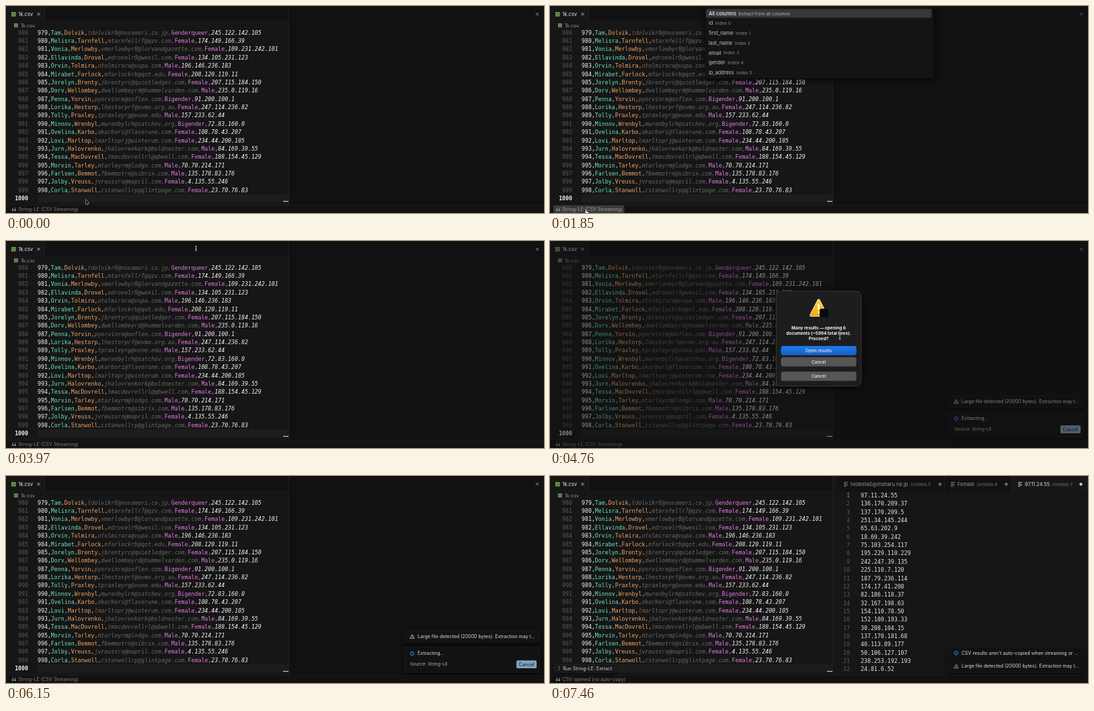
An HTML page with a canvas that plays this animation: 800 px wide and 309 px high, repeating every 7490 ms.

```html
<!DOCTYPE html>
<html lang="en">
<head>
<meta charset="utf-8">
<title>CSV extraction</title>
<style>
html, body { margin: 0; width: 100%; height: 100%; overflow: hidden; background: #121212; }
canvas { display: block; width: 800px; height: 309px; }
</style>
</head>
<body>
<canvas id="stage"></canvas>
<script>
const W = 800, H = 309, LOOP = 7490;
const MONO = '"DejaVu Sans Mono", "Noto Sans Mono", monospace';
const SANS = 'Inter, Roboto, sans-serif';
const CODE = 8.26, ROW = 12.37;

const T = {
  hoverOn: 960, pick: 1640, hoverOff: 2480, picked: 3850, toast: 4010,
  modal: 4260, press: 5700, close: 5780, closed: 5980, results: 6230, hide: 6130
};

const people = `Tam Dolvik nuvamori.co.jp Genderqueer 245.122.142.105
Melisra Tarnfell qzv.com Female 174.149.166.39
Vonia Merlowby lorvandgazette.com Female 109.231.242.101
Ellavinda Drovel wexil.com Female 134.105.231.123
Orvin Tolmira vupa.com Male 196.146.236.183
Mirabet Farlock qot.edu Female 208.120.119.11
Jorelyn Brenty quietledger.com Female 207.115.184.150
Dorv Wellombey hummelvarden.com Male 235.0.119.16
Penna Yorvin ooflen.com Bigender 91.200.100.1
Lorika Hestorp evmo.org.au Female 247.114.236.82
Tolly Praxley vune.edu Male 157.233.62.44
Minnov Wrenbyl satchov.org Bigender 72.83.160.0
Ovelina Karbo flavorune.com Female 108.78.43.207
Lovi Marltop winterum.com Female 234.44.200.105
Jurn Halovrenko boldnester.com Male 84.169.39.55
Tessa MacDovrell qbwell.com Female 188.154.45.129
Morvin Tarley lodgo.com Male 70.70.214.171
Farlsen Bemmot sibrix.com Male 135.178.83.176
Jolby Vreuss mapril.com Female 4.135.55.246
Corla Stanwoll glintpage.com Female 23.70.76.83`.split('\n').map((line, i) => {
  const [first, last, host, gender, ip] = line.split(' ');
  const mail = first[0].toLowerCase() + last.toLowerCase() + (978 + i).toString(36) + '@' + host;
  return [String(979 + i), first, last, mail.replace(/^(.*?)(..)@/, (m, a) => a + 'r' + (6 + i).toString(36) + '@'), gender, ip];
});

const addresses = `97.11.24.55 136.170.209.37 137.170.209.5 251.34.145.244 65.63.202.9
18.69.39.242 75.103.254.117 195.229.110.229 242.247.39.135 225.110.7.120
187.79.236.114 174.17.41.208 82.186.118.37 32.167.198.63 154.110.78.50
152.180.193.33 30.208.104.15 137.170.181.68 40.113.89.177 50.106.127.107
238.253.192.193 24.81.6.52 31.176.49.136`.split(/\s+/);

const columns = ['id', 'first_name', 'last_name', 'email', 'gender', 'ip_address'];
const inks = ['#f4f4f4', '#69e8bf', '#efa461', '#686868', '#e57be6', '#f4f4f4'];

const canvas = document.getElementById('stage');
const c = canvas.getContext('2d');
const dpr = window.devicePixelRatio || 1;
canvas.width = W * dpr;
canvas.height = H * dpr;
c.textBaseline = 'alphabetic';

const clamp = v => Math.max(0, Math.min(1, v));
const ease = v => (v = clamp(v), v * v * (3 - 2 * v));

// y is the middle of the lowercase letters
function text(s, x, y, size, color, style = '', align = 'left', font = SANS) {
  c.font = `${style} ${size}px ${font}`;
  c.textAlign = align;
  c.fillStyle = color;
  c.fillText(s, x, y + size * 0.34);
  return c.measureText(s).width;
}
const code = (s, x, y, color, style, align) => text(s, x, y, CODE, color, style, align, MONO);

function rect(x, y, w, h, color) {
  c.fillStyle = color;
  c.fillRect(x, y, w, h);
}

function box(x, y, w, h, r, fill, stroke) {
  c.beginPath();
  c.roundRect(x, y, w, h, r);
  c.fillStyle = fill;
  c.fill();
  if (stroke) {
    c.shadowColor = 'transparent';
    c.strokeStyle = stroke;
    c.lineWidth = 0.6;
    c.stroke();
  }
}

function shadowed(blur, color, draw) {
  c.save();
  c.shadowColor = color;
  c.shadowBlur = blur * dpr;
  c.shadowOffsetY = 2 * dpr;
  draw();
  c.restore();
}

function lines(points, color, width = 0.8) {
  c.beginPath();
  for (const [x1, y1, x2, y2] of points) {
    c.moveTo(x1, y1);
    c.lineTo(x2, y2);
  }
  c.strokeStyle = color;
  c.lineWidth = width;
  c.stroke();
}

function cross(x, y, color) {
  const r = 2.2;
  lines([[x - r, y - r, x + r, y + r], [x - r, y + r, x + r, y - r]], color);
}

function dot(x, y, r, color) {
  c.beginPath();
  c.arc(x, y, r, 0, 7);
  c.fillStyle = color;
  c.fill();
}

function tableIcon(x, y, s) {
  rect(x, y, s, s, '#83b65b');
  const a = s / 3;
  lines([[x, y + a, x + s, y + a], [x, y + 2 * a, x + s, y + 2 * a],
    [x + a, y, x + a, y + s], [x + 2 * a, y, x + 2 * a, y + s]], '#31482a', 0.6);
}

function leftPane() {
  rect(0, 0, 420, 297, '#161617');
  rect(57, 0, 363, 23.5, '#111112');
  rect(57, 0, 0.7, 23.5, '#262626');
  rect(57, 23, 363, 0.6, '#222');
  rect(420, 0, 0.8, 297, '#262626');
  tableIcon(8, 9, 6.5);
  text('1k.csv', 18.6, 12.2, 7.4, '#eeeeee');
  cross(48.5, 12.2, '#d8d8d8');

  rect(47, 281, 373, 12.2, '#1d1d1e');
  c.save();
  c.beginPath();
  c.rect(0, 34.5, 420, 263);
  c.clip();
  people.forEach((fields, i) => {
    const y = 39.9 + i * ROW;
    code(String(980 + i), 33, y, '#5a5a5a', '', 'right');
    let x = 47;
    fields.forEach((f, k) => {
      x += code(f + (k < 5 ? ',' : ''), x, y, inks[k], k === 3 || k === 5 ? 'italic' : '');
    });
  });
  code('1000', 33, 287.3, '#f2f2f2', 'bold', 'right');
  c.restore();
  rect(412, 291, 8, 1.2, '#c8c8c8');
  tableIcon(12, 26, 5.8);
  text('1k.csv', 22, 29.2, 7.3, '#929292');
}

function fileTab(x, w, name, label, active) {
  rect(x, 0, w, 23.5, active ? '#171718' : '#121213');
  rect(x + w - 0.7, 0, 0.7, 23.5, '#272727');
  const ink = active ? '#dcdcdc' : '#969696';
  lines([[x + 9, 9.5, x + 15, 9.5], [x + 9, 11.5, x + 13.5, 11.5],
    [x + 9, 13.5, x + 15, 13.5], [x + 9, 15.5, x + 12.5, 15.5]], ink, 0.8);
  const end = x + 19 + text(name, x + 19, 12.2, 7.4, ink);
  text(label, end + 4, 12.6, 6.4, '#707070');
}

function rightPane(open) {
  rect(420.8, 0, 379.2, 297, open ? '#161617' : '#111112');
  if (!open) {
    cross(790, 12.2, '#a0a0a0');
    return;
  }
  fileTab(428, 159, 'tvolesta0@monaru.ne.jp', 'Untitled-5');
  fileTab(587, 100, 'Female', 'Untitled-6');
  fileTab(687, 113, '97.11.24.55', 'Untitled-7', true);
  dot(580, 12.2, 2.2, '#6d6d6d');
  dot(678.5, 12.2, 2.2, '#6d6d6d');
  dot(789.5, 12.2, 2.2, '#c8c8c8');
  c.save();
  c.beginPath();
  c.rect(421, 23, 379, 274);
  c.clip();
  addresses.forEach((ip, i) => {
    const y = 29.2 + i * 12.35;
    code(String(i + 1), 446, y, i ? '#5a5a5a' : '#8a8a8a', '', 'right');
    code(ip, 462, y, '#e6e6e6');
  });
  c.restore();
}

function quoteIcon(x, y) {
  for (const dx of [0, 3.6]) {
    dot(x + dx + 1.4, y + 1.3, 1.35, '#8c8c8c');
    c.beginPath();
    c.moveTo(x + dx + 0.4, y + 1);
    c.quadraticCurveTo(x + dx + 0.4, y - 1.8, x + dx + 2.6, y - 2.5);
    c.strokeStyle = '#8c8c8c';
    c.lineWidth = 0.9;
    c.stroke();
  }
}

function statusBar(t) {
  rect(0, 297, W, 12, '#121213');
  rect(0, 297, W, 0.6, '#222');
  const hover = t >= T.hoverOn && t < T.hoverOff;
  if (hover) box(5, 297.6, 105.5, 11.4, 1.5, '#3a3a3a');
  quoteIcon(8.8, 303.5);
  const label = t < T.results ? 'String-LE (CSV Streaming)' : 'CSV opened (no auto-copy)';
  text(label, 18.3, 303.6, 7.1, hover ? '#a2a2a2' : '#808080');
}

function tooltip() {
  shadowed(4, '#000a', () => box(5, 281, 93, 12.4, 2, '#19191a', '#292929'));
  dot(13.3, 285.3, 0.7, '#d0d0d0');
  dot(13.3, 288.8, 0.7, '#d0d0d0');
  text('Run String-LE: Extract', 19.2, 287.3, 7, '#cfcfcf');
}

function quickPick() {
  shadowed(10, '#000d', () => box(230.5, 0, 340, 108, [0, 0, 4, 4], '#141415'));
  box(232, 4.6, 335.5, 12.8, 2, '#373738');
  ['All columns', ...columns].forEach((name, i) => {
    const y = 11.2 + i * 14.7;
    const w = text(name, 236, y, 7.4, i ? '#c4c4c4' : '#f2f2f2', i ? '' : '500');
    text(i ? `Index ${i - 1}` : 'Extract from all columns', 236 + w + 3.5, y + 0.2, 6.7, i ? '#868686' : '#b8b8b8');
  });
}

function warnIcon(x, y, color) {
  c.beginPath();
  c.moveTo(x, y - 3);
  c.lineTo(x + 3.2, y + 2.7);
  c.lineTo(x - 3.2, y + 2.7);
  c.closePath();
  c.strokeStyle = color;
  c.lineWidth = 0.8;
  c.stroke();
  lines([[x, y - 1, x, y + 0.8], [x, y + 1.4, x, y + 2]], color, 0.7);
}

function infoIcon(x, y) {
  c.beginPath();
  c.arc(x, y, 2.8, 0, 7);
  c.strokeStyle = '#3794ff';
  c.lineWidth = 0.9;
  c.stroke();
  lines([[x, y - 1.5, x, y - 0.8], [x, y - 0.3, x, y + 1.5]], '#3794ff', 0.7);
}

const toastBox = (y, h) => shadowed(6, '#000c', () => box(591.5, y, 202.5, h, 2.5, '#121213', '#202021'));
const bigFile = 'Large file detected (20000 bytes). Extraction may t...';

function toasts(done) {
  if (done) {
    toastBox(255, 18.5);
    toastBox(275, 18.5);
    infoIcon(604, 264.3);
    text("CSV results aren't auto-copied when streaming or ...", 612, 264.2, 7, '#dedede');
    warnIcon(604, 284, '#dc9450');
    text(bigFile, 612, 284, 7, '#dedede');
    return;
  }
  toastBox(230.5, 18.5);
  toastBox(255.5, 38);
  warnIcon(604, 239.6, '#d0d0d0');
  text(bigFile, 612, 239.8, 7, '#dedede');
  infoIcon(604, 265);
  text('Extracting...', 612, 265, 7, '#dedede');
  text('Source: String-LE', 601, 281, 6.7, '#b4b4b4');
  box(759, 275.3, 30, 11.8, 1.5, '#81a1c1');
  text('Cancel', 774, 281.2, 7, '#15181d', '', 'center');
}

function button(y, label, fill) {
  box(343.5, y, 112, 13.7, 3.2, fill);
  text(label, 399.5, y + 6.9, 6.4, '#f0f0f0', '500', 'center');
}

function caution() {
  c.beginPath();
  c.moveTo(399.5, 88.5);
  c.lineTo(411, 111);
  c.lineTo(388, 111);
  c.closePath();
  c.lineJoin = 'round';
  c.strokeStyle = '#e9e6dc';
  c.lineWidth = 4;
  c.stroke();
  const g = c.createLinearGradient(0, 88, 0, 112);
  g.addColorStop(0, '#ffd13a');
  g.addColorStop(1, '#efab0c');
  c.fillStyle = c.strokeStyle = g;
  c.lineWidth = 2.4;
  c.stroke();
  c.fill();
  c.lineJoin = 'miter';
  box(398.2, 94, 2.6, 9, 1.3, '#fffdf4');
  dot(399.5, 106.4, 1.5, '#fffdf4');
  box(401, 101, 13, 13, 2.8, '#0b0b0b');
}

function modal(t) {
  const shown = t < T.close ? ease((t - T.modal) / 160) : 1 - (t - T.close) / (T.closed - T.close);
  const leaving = t >= T.close;
  const s = 0.9 + 0.1 * shown;
  c.save();
  c.globalAlpha = clamp(shown);
  c.translate(399.5, 145.5);
  c.scale(s, s);
  c.translate(-399.5, -145.5);
  shadowed(14, '#000c', () => box(336.3, 75, 126.6, 141.5, 7, leaving ? '#252525' : '#1d1d1e', '#505050'));
  caution();
  ['Many results — opening 6', 'documents (~5994 total lines).', 'Proceed?'].forEach((s, i) =>
    text(s, 399.5, 130 + i * 8, 6.4, '#f4f4f4', 'bold', 'center'));
  const blue = c.createLinearGradient(0, 157, 0, 171);
  blue.addColorStop(0, '#2279e8');
  blue.addColorStop(1, '#1260ca');
  button(156.7, 'Open results', leaving ? '#737373' : t >= T.press ? '#1a58ad' : blue);
  button(173.6, 'Cancel', '#565656');
  button(195, 'Cancel', '#565656');
  c.restore();
}

function polygon(points, fill, stroke) {
  c.beginPath();
  points.forEach(([x, y]) => c.lineTo(x, y));
  c.closePath();
  c.lineJoin = 'round';
  c.strokeStyle = stroke;
  c.lineWidth = 1;
  c.stroke();
  c.fillStyle = fill;
  c.fill();
  c.lineJoin = 'miter';
}

// start, end, x, y
const moves = [
  [480, 1120, 53.5, 304], [2400, 3200, 282.5, 11],
  [4080, 4700, 431, 143.5], [4980, 5480, 422.5, 168]
];

function pointer(t) {
  let x = 118.5, y = 289;
  for (const [a, b, tx, ty] of moves) {
    const k = ease((t - a) / (b - a));
    x += (tx - x) * k;
    y += (ty - y) * k;
  }
  const picking = t >= T.pick && t < T.picked && y < 108 && x > 230;
  const hand = picking || (t >= T.hoverOn && t < T.hoverOff);
  const beam = !hand && t >= T.hoverOff && t < 5300;
  c.save();
  c.translate(x, y);
  if (beam) {
    const shape = [[-1.5, -3.6, 0, -3], [1.5, -3.6, 0, -3], [0, -3, 0, 3], [-1.5, 3.6, 0, 3], [1.5, 3.6, 0, 3], [-1, 1.2, 1, 1.2]];
    lines(shape, '#000', 1.8);
    lines(shape, '#eee', 0.8);
  } else if (hand) {
    polygon([[-0.7, 0], [0.5, 0], [0.8, 3], [3.8, 3.8], [4, 6.2], [3, 8.6], [-0.6, 8.6], [-2.8, 5.2], [-2.2, 4.4], [-0.8, 5.4]], '#fff', '#111');
  } else {
    polygon([[0, 0], [0, 6.6], [1.6, 5.2], [2.7, 7.5], [3.8, 7], [2.8, 4.8], [4.8, 4.6]], '#0a0a0a', '#e8e8e8');
  }
  c.restore();
}

function draw(t) {
  c.setTransform(dpr, 0, 0, dpr, 0, 0);
  const done = t >= T.results;
  leftPane();
  rightPane(done);
  statusBar(t);
  if (t >= T.pick && t < T.picked) {
    rect(780, 5, 20, 14, 'rgba(17,17,18,.5)');
    quickPick();
  }
  if (t >= T.toast) toasts(done);
  if (done) tooltip();
  if (t >= T.modal && t < T.closed + 100) {
    const dim = 0.45 * ease((t - T.modal) / 160) * (1 - clamp((t - T.close + 30) / 330));
    rect(0, 0, W, H, `rgba(16,16,16,${dim})`);
    if (t < T.closed) modal(t);
  }
  if (t < T.hide) pointer(t);
}

const start = performance.now();
function tick() {
  draw((performance.now() - start) % LOOP);
  requestAnimationFrame(tick);
}
tick();
</script>
</body>
</html>
```
